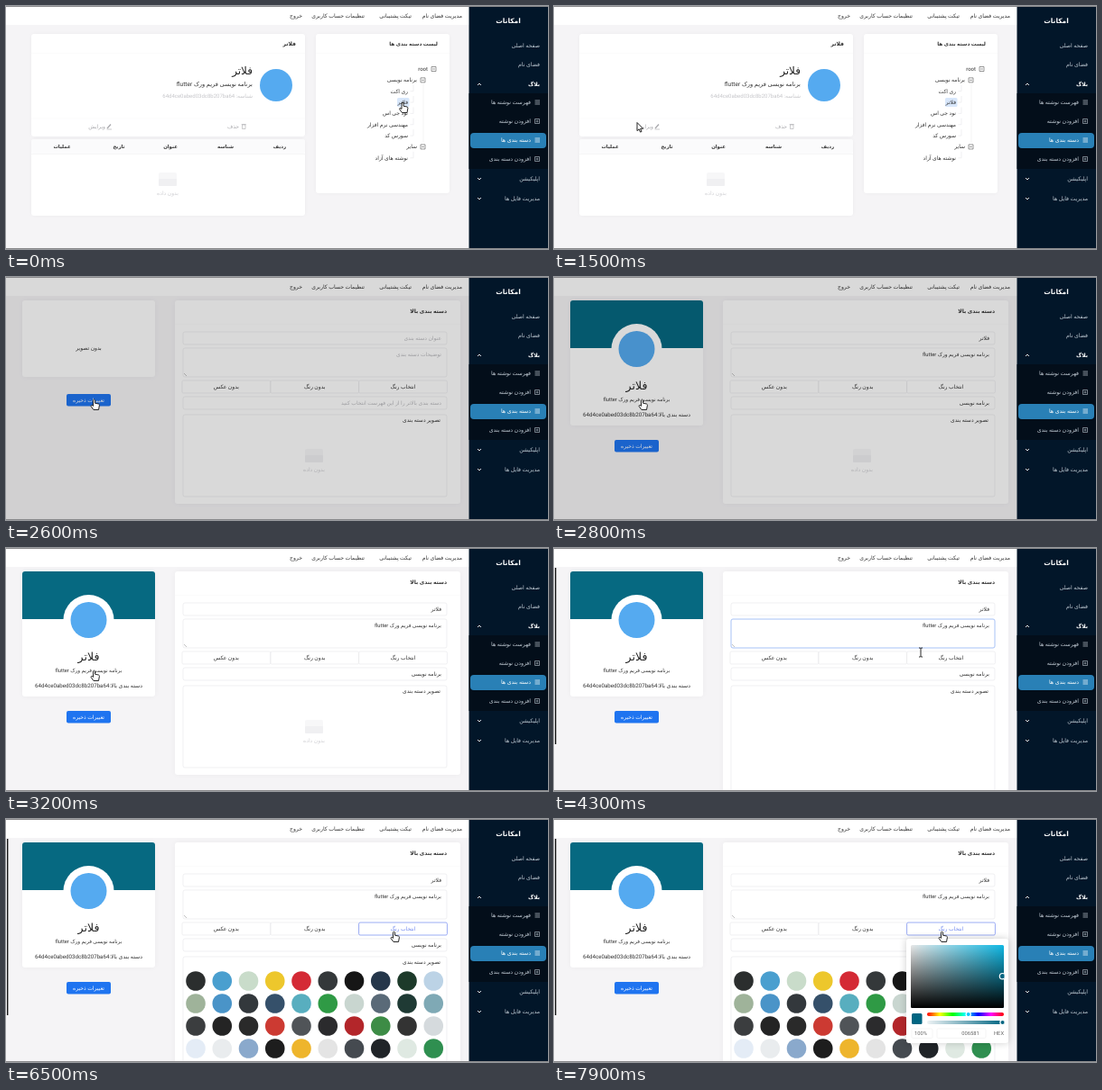
An HTML page with a canvas that plays this animation: 600x270 px, repeating every 8000 ms.

```html
<!DOCTYPE html>
<html lang="fa">
<head>
<meta charset="utf-8">
<title>Category editor</title>
<style>
html, body { margin: 0; width: 100%; height: 100%; overflow: hidden; background: #f5f4f6; }
canvas { display: block; }
</style>
</head>
<body>
<canvas id="stage" width="600" height="270"></canvas>
<script>
const c = document.getElementById('stage').getContext('2d');
const LOOP = 8000;
const TEAL = '#066981', BLUE = '#1f74f0', MARK = '#55aaf0', LINE = '#e6e6ea', INK = '#333', EDGE = '#8a8a8c';
const ID = '64d4ce0abed03dc8b207ba64';
const NAME = 'فلاتر', ABOUT = 'برنامه نویسی فریم ورک flutter', GROUP = 'برنامه نویسی';

const progress = (t, from, to) => Math.min(1, Math.max(0, (t - from) / (to - from)));
const smooth = p => p * p * (3 - 2 * p);

function text(str, x, y, { size = 6, color = INK, align = 'right', bold = false } = {}) {
  c.font = `${bold ? 'bold ' : ''}${size}px Roboto, "DejaVu Sans", sans-serif`;
  c.direction = 'rtl';
  c.textAlign = align;
  c.fillStyle = color;
  c.fillText(str, x, y + size * 0.32);
}

function box(x1, y1, x2, y2, { fill, stroke, r = 0, width = 0.6 } = {}) {
  c.beginPath();
  c.roundRect(x1, y1, x2 - x1, y2 - y1, r);
  if (fill) { c.fillStyle = fill; c.fill(); }
  if (stroke) { c.strokeStyle = stroke; c.lineWidth = width; c.stroke(); }
}

function card(x1, y1, x2, y2, blur = 4) {
  c.save();
  c.shadowColor = 'rgba(0,0,0,.04)';
  c.shadowBlur = blur;
  box(x1, y1, x2, y2, { fill: '#fff', r: 3 });
  c.restore();
}

function disc(x, y, r, fill, stroke) {
  c.beginPath();
  c.arc(x, y, r, 0, 7);
  c.fillStyle = fill;
  c.fill();
  if (stroke) { c.strokeStyle = stroke; c.lineWidth = 1.2; c.stroke(); }
}

function line(points, color, width = 0.6) {
  c.beginPath();
  points.forEach(([x, y]) => c.lineTo(x, y));
  c.strokeStyle = color;
  c.lineWidth = width;
  c.stroke();
}

function gradient(x1, y1, x2, y2, ...colors) {
  const g = c.createLinearGradient(x1, y1, x2, y2);
  colors.forEach((color, i) => g.addColorStop(i / (colors.length - 1), color));
  return g;
}

function toggle(x, y, color, plus) {
  box(x - 2.5, y - 2.5, x + 2.5, y + 2.5, { stroke: color });
  line([[x - 1.4, y], [x + 1.4, y]], color);
  if (plus) line([[x, y - 1.4], [x, y + 1.4]], color);
}

function emptyState(x, y) {
  box(x - 10, y - 7, x + 10, y + 8, { fill: '#f7f7f8', r: 2 });
  box(x - 10, y, x + 10, y + 8, { fill: '#f0f0f2', r: 1 });
  text('بدون داده', x, y + 16, { color: '#cfcfd3', align: 'center' });
}

function topBar() {
  box(0, 0, 513, 21, { fill: '#fff' });
  [['مدیریت فضای نام', 505], ['تیکت پشتیبانی', 449], ['تنظیمات حساب کاربری', 397], ['خروج', 328]]
    .forEach(([label, x]) => text(label, x, 11, { size: 6.1 }));
}

function sidebar() {
  const soft = '#c3ccd5', size = 6.2;
  box(512.5, 0, 600, 270, { fill: '#021629' });
  box(512.5, 97, 600, 181, { fill: '#030e1a' });
  text('امکانات', 556, 17, { size: 7.5, bold: true, color: '#fff', align: 'center' });
  [['صفحه اصلی', 44], ['فضای نام', 65], ['اپلیکیشن', 192], ['مدیریت فایل ها', 214]]
    .forEach(([label, y]) => text(label, 591, y, { color: soft, size }));
  text('بلاگ', 591, 87, { bold: true, color: '#fff' });
  [[87, 1], [192, -1], [214, -1]].forEach(([y, dir]) =>
    line([[522, y + dir], [524, y - dir], [526, y + dir]], '#d5dde5', 1));

  box(514, 141, 598, 158, { fill: '#2980b6', r: 4 });
  ['فهرست نوشته ها', 'افزودن نوشته', 'دسته بندی ها', 'افزودن دسته بندی'].forEach((label, i) => {
    const y = 107 + i * 21, color = i === 2 ? '#fff' : soft;
    text(label, 581, y, { color, size });
    if (i % 2) toggle(588, y, color, true);
    else for (const d of [-2, 0, 2]) line([[585.5, y + d], [591, y + d]], color, 0.7);
  });
}

function categoryList() {
  const muted = '#a9a9ad';
  card(28, 31, 331, 145);
  text(NAME, 321, 42, { bold: true });
  line([[28, 52.5], [331, 52.5]], '#f8f8f9');
  disc(299, 88, 18, MARK);
  text(NAME, 273, 72, { size: 12, color: '#222' });
  text(ABOUT, 273, 87, { size: 6.6 });
  text('شناسه: ' + ID, 273, 100, { color: '#c6c6ca' });
  line([[28, 125], [331, 125]], '#f9f9fa');
  text('حذف', 258, 134, { color: muted });
  box(261.5, 132, 265, 136.5, { stroke: muted });
  line([[260.7, 131.5], [265.8, 131.5]], muted);
  text('ویرایش', 110, 134, { color: muted });
  line([[112, 136], [116, 131.5]], muted, 1.3);
  line([[111.5, 137], [117, 137]], muted);

  card(28, 148, 331, 233);
  box(28, 148, 331, 164, { fill: '#fbfbfc', r: 3 });
  line([[28, 164.5], [331, 164.5]], '#f0f0f2');
  [['ردیف', 303], ['شناسه', 243], ['عنوان', 182], ['تاریخ', 125], ['عملیات', 62]]
    .forEach(([label, x]) => text(label, x, 156, { size: 5.4, bold: true, align: 'center' }));
  emptyState(179, 192);

  card(343, 31, 491, 208);
  text('لیست دسته بندی ها', 478, 42, { size: 5.7, bold: true });
  line([[343, 52.5], [491, 52.5]], '#f8f8f9');
  line([[462, 86], [462, 152]], '#ececef');
  box(433, 102, 446.5, 112, { fill: '#d8e7fb', r: 1.5 });
  [['root', 0], [GROUP, 1], ['ری اکت', 2], [NAME, 2], ['نود جی اس', 2], ['مهندسی نرم افزار', 2],
   ['سورس کد', 2], ['سایر', 1], ['نوشته های آزاد', 2]].forEach(([label, depth], i) => {
    const y = 70 + i * 12.35, x = [467, 455, 445][depth];
    text(label, x, y);
    if (depth < 2) toggle(x + 6.5, y, '#555');
    else line([[451, y - 7], [451, y], [447.5, y]], LINE);
  });
}

function previewCard(loaded) {
  card(18, 26, 165, loaded ? 165 : 111, 6);
  if (loaded) {
    box(18, 26, 165, 79, { fill: TEAL, r: [3, 3, 0, 0] });
    disc(91.5, 80, 28, '#fff');
    disc(91.5, 80, 20, MARK);
    text(NAME, 91.5, 121, { size: 12.5, color: '#222', align: 'center' });
    text(ABOUT, 91.5, 136, { size: 5.8, align: 'center' });
    text('دسته بندی بالا:' + ID, 91.5, 153, { size: 6.2, align: 'center' });
  } else {
    text('بدون تصویر', 91.5, 79, { align: 'center' });
  }
  const y = loaded ? 181 : 130;
  box(67, y, 116, y + 13.5, { fill: BLUE, r: 2 });
  text('تغییرات ذخیره', 91.5, y + 7, { color: '#fff', align: 'center' });
}

// Main tint of each picture, row by row.
const TINTS = ('2b2e2e 4a9fcf c9dcca edc72c d42a35 34383a 161616 25364a 1d3a2a bcd3e6 ' +
  '9fb39a 4a94c8 33383c 35506a 58aebf 2f9a45 c9d6d0 5a6a78 1f3a34 7fa9b5 ' +
  '3b3d3f 242424 2a2a2a cc3a32 505458 2b2b2d b3262a 3d8c46 333333 d5dadd ' +
  'e4ecf6 e9ecee 8aa9cc 1d1d1d eeb52c e4e4e4 454a50 202428 dfe9e2 2f8f50').split(' ');

function pictures(t) {
  TINTS.forEach((tint, i) => {
    c.globalAlpha = progress(t, 4450 + i * 15, 4550 + i * 15);
    disc(210 + (i % 10) * 29.25, 180 + Math.floor(i / 10) * 25, 10.8, '#' + tint);
  });
  c.globalAlpha = 1;
}

function editForm(t, loaded, tall) {
  const typing = t > 4150 && t < 4450, picking = t > 4650;
  const hint = { color: '#b9b9bd' };
  card(187, 26, 503, tall ? 290 : 252, 6);
  text('دسته بندی بالا', 488, 38, { bold: true });
  line([[187, 52.5], [503, 52.5]], '#f8f8f9');
  box(196, 61, 488, 75, { stroke: LINE, r: 2 });
  box(196, 79, 488, 111, { stroke: typing ? '#9dbcf5' : LINE, r: 2, width: typing ? 0.9 : 0.6 });
  line([[197, 107], [200, 110]], '#999');
  text(loaded ? NAME : 'عنوان دسته بندی', 482, 68, loaded ? {} : hint);
  text(loaded ? ABOUT : 'توضیحات دسته بندی', 482, 86, loaded ? { size: 5.8 } : hint);

  ['بدون عکس', 'بدون رنگ', 'انتخاب رنگ'].forEach((label, i) => {
    const x = 195 + i * 97.8, active = picking && i === 2;
    box(x, 115, x + 97.8, 129, { stroke: active ? '#8297f2' : LINE, r: 1.5, width: active ? 0.8 : 0.6 });
    text(label, x + 48.9, 122, { align: 'center', color: active ? '#7189ee' : INK });
  });

  box(196, 133, 488, 147, { stroke: LINE, r: 2 });
  text(loaded ? GROUP : 'دسته بندی بالاتر را از این فهرست انتخاب کنید', 482, 140, loaded ? {} : hint);
  box(196, 153, 488, tall ? 290 : 244, { stroke: LINE, r: 2 });
  text('تصویر دسته بندی', 481, 159);
  if (tall) {
    pictures(t);
    box(1, 22, 2.4, 218, { fill: '#151515' });
  } else {
    emptyState(341, 198);
  }
}

function colorPicker(alpha) {
  if (!alpha) return;
  c.save();
  c.globalAlpha = alpha;
  c.save();
  c.shadowColor = 'rgba(0,0,0,.2)';
  c.shadowBlur = 8;
  box(390, 133, 503, 249, { fill: '#fff', r: 3 });
  c.restore();

  box(395, 140, 498, 210, { fill: gradient(395, 0, 498, 0, '#e8e8e8', '#10b8e4'), r: 1.5 });
  box(395, 140, 498, 210, { fill: gradient(0, 140, 0, 210, 'rgba(0,0,0,0)', '#000'), r: 1.5 });
  box(413, 215, 498, 219, { fill: gradient(413, 0, 498, 0, '#f00', '#ff0', '#0f0', '#0ff', '#00f', '#f0f', '#f00'), r: 2 });
  box(413, 224, 498, 228, { fill: gradient(413, 0, 498, 0, '#edf2f4', '#006581'), r: 2 });
  box(396, 216, 407.5, 228, { fill: '#006581', r: 1.5 });
  c.beginPath();
  c.rect(390, 133, 108.5, 116);
  c.clip();
  disc(496.5, 174.7, 3.2, '#006581', '#fff');
  disc(458.7, 217, 2.6, '#00c8ff', '#fff');
  disc(496.5, 226, 2.6, '#006581', '#fff');

  const muted = { size: 5.8, color: '#666', align: 'center' };
  box(396, 233, 419, 243.5, { stroke: '#eee', r: 1.5 });
  box(424, 233, 478, 243.5, { stroke: '#eee', r: 1.5 });
  text('100%', 406, 238, muted);
  text('006581', 461, 238, muted);
  text('HEX', 492.5, 238, muted);
  c.restore();
}

const CURSORS = {
  arrow: 'M0 0V9.2L2.1 7.3 3.5 10.6 5 10 3.6 6.8H6.6Z',
  hand: 'M-1 .8Q0-.6 1 .8V4.2L5 5Q6 5.4 5.9 6.6L5 11.5H-.6L-3.4 7.6Q-3.4 6-2 6.6L-1 7.4Z',
  beam: 'M-2 0H-.5L0 .6.5 0H2M0 .6V9.4M-2 10H-.5L0 9.4.5 10H2'
};

// Time, x, y of the pointer tip.
const PATH = [[0, 439, 107], [650, 439, 107], [1300, 92, 129.5], [1550, 92, 129.5], [1800, 97.5, 136],
  [3300, 97.5, 136], [4300, 406, 111], [4750, 429.5, 125], [LOOP, 429.5, 125]];

function cursor(t) {
  const i = PATH.findIndex(([time]) => time > t);
  const [t0, x0, y0] = PATH[i - 1], [t1, x1, y1] = PATH[i];
  const p = smooth(progress(t, t0, t1));
  const x = x0 + (x1 - x0) * p, y = y0 + (y1 - y0) * p;
  const shape = t < 700 || (t > 1700 && t < 3400) || t > 4550 ? 'hand'
    : t > 3400 && x > 196 ? 'beam' : 'arrow';
  const path = new Path2D(CURSORS[shape]);
  c.save();
  c.translate(x, y);
  c.lineJoin = 'round';
  c.lineWidth = 0.9;
  c.strokeStyle = '#111';
  c.fillStyle = '#fff';
  if (shape !== 'beam') c.fill(path);
  c.stroke(path);
  c.restore();
}

function draw(t) {
  box(0, 0, 600, 270, { fill: '#f5f4f6' });
  topBar();
  if (t < 2450) {
    categoryList();
  } else {
    const loaded = t >= 2700;
    previewCard(loaded);
    editForm(t, loaded, t >= 3500);
    colorPicker(progress(t, 7750, 7870));
  }
  const shade = 0.15 * progress(t, 2350, 2520) * (1 - progress(t, 2950, 3150));
  if (shade) box(0, 0, 513, 270, { fill: `rgba(0,0,0,${shade})` });
  sidebar();
  box(0, 0, 600, 1, { fill: EDGE });
  box(0, 269, 600, 270, { fill: EDGE });
  cursor(t);
}

c.textRendering = 'geometricPrecision';
const start = performance.now();
(function tick() {
  draw((performance.now() - start) % LOOP);
  requestAnimationFrame(tick);
})();
</script>
</body>
</html>
```
